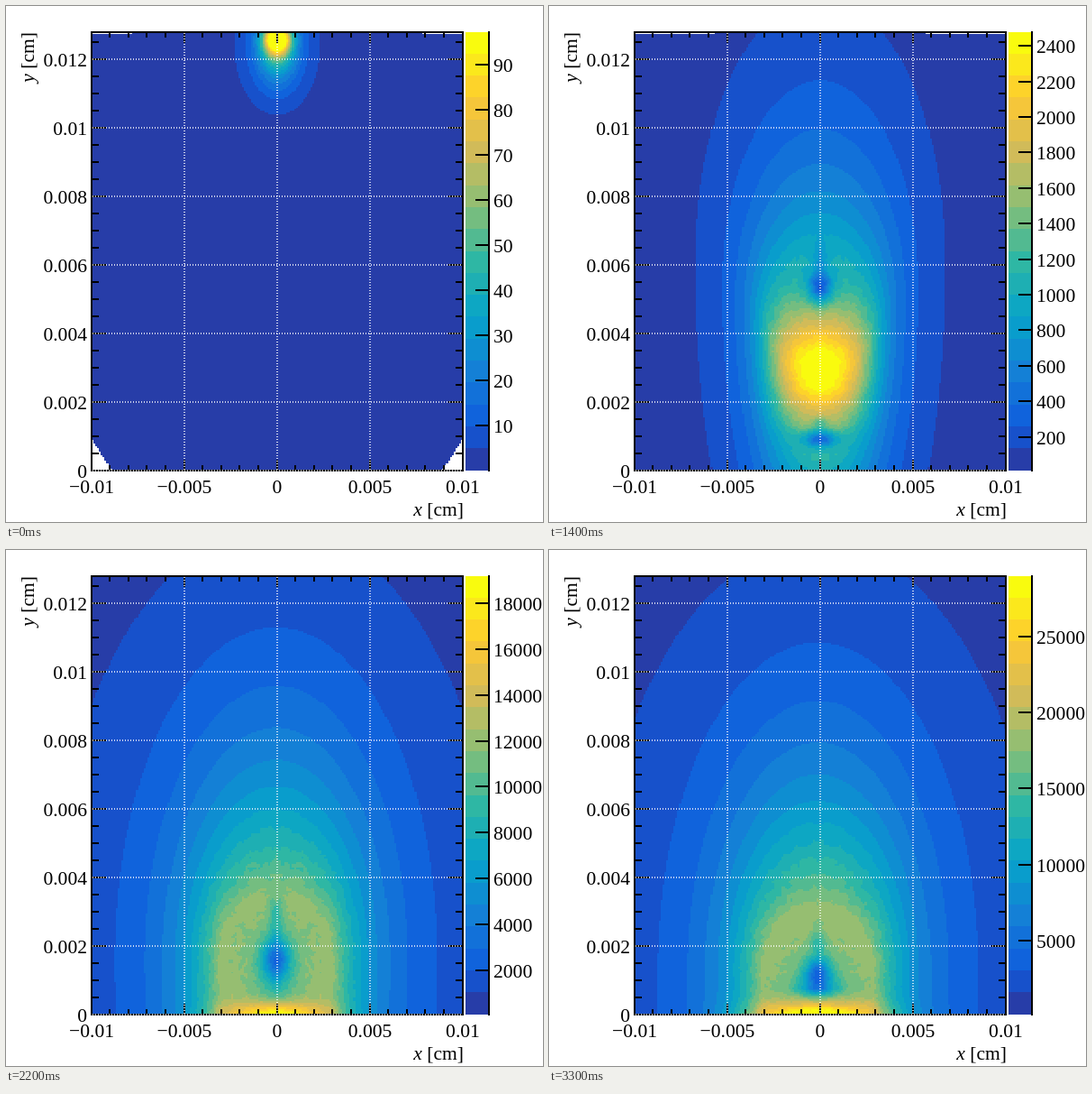
Write an HTML page with a canvas that moves like this. It is 596x572 px and loops after 3.4 s.

```html
<!DOCTYPE html>
<html lang="en">
<head>
<meta charset="utf-8">
<title>Field map</title>
<style>
html, body { margin: 0; width: 100%; height: 100%; overflow: hidden; background: #fff; }
canvas { display: block; }
</style>
</head>
<body>
<canvas id="stage" width="596" height="572"></canvas>
<script>
const ctx = document.getElementById('stage').getContext('2d');
const FRAMES = 34, STEP = 100;
const L = 95, T = 29, W = 412, H = 486, R = L + W, B = T + H;
const COLS = 200, ROWS = 256, BANDS = 20;
const FONT = '21.6px "Liberation Serif", "Times New Roman", serif';

const clamp = (v, lo, hi) => Math.max(lo, Math.min(hi, v));
const mix = (a, b, u) => Array.isArray(a) ? a.map((v, i) => mix(v, b[i], u)) : a + (b - a) * u;

// Colour scale: nine even stops, sampled once per band
const red = [.2082, .0592, .078, .0232, .1802, .5301, .8186, .9956, .9764];
const green = [.1664, .3599, .5041, .6419, .7178, .7492, .7328, .7862, .9832];
const blue = [.5293, .8684, .8385, .7914, .6425, .4662, .3499, .1968, .0539];
const palette = Array.from({ length: BANDS }, (_, k) => {
  const p = Math.floor((k + .99) * 255 / BANDS) / 254 * 8;
  const i = Math.min(7, Math.floor(p));
  return [red, green, blue].map(c => Math.round(255 * mix(c[i], c[i + 1], p - i)));
});

// width, fall: outer half width and its power law over the levels
// mid, top, bottom: y at the lowest and the highest level
// glow, upper, lower: y, x radius, y radius, strength
const start = {
  at: 0, max: 97.2, cap: 20, width: 48, fall: .45, mid: [42, 38], top: [-18, 28], bottom: [121, 46],
  glow: [38, 14, 12, 5], upper: [45, 4, 6, 0], lower: [70, 6, 10, 0]
};
const drift = {
  at: 4, max: 85.9, cap: 12, width: 78, fall: .45, mid: [170, 85], top: [-33, 0], bottom: [307, 125],
  glow: [118, 18, 24, 9], upper: [74, 5, 14, -11], lower: [175, 9, 22, -6]
};
const swell = {
  at: 8, max: 266.5, cap: 20, width: 106, fall: .4, mid: [265, 232], top: [-205, 215], bottom: [481, 236],
  glow: [235, 18, 18, 1], upper: [158, 9, 13, -8], lower: [297, 15, 9, -5]
};
const plunge = {
  at: 14, max: 2480, cap: 20, width: 139, fall: .35, mid: [285, 400], top: [-10, 390], bottom: [740, 420],
  glow: [400, 32, 30, 1], upper: [312, 13, 17, -7], lower: [480, 16, 9, -6.5]
};
const strike = {
  at: 19, max: 12470, cap: 12.5, width: 261, fall: .5, mid: [440, 440], top: [-56, 440], bottom: [1140, 560],
  glow: [522, 42, 20, 8], upper: [440, 15, 32, -8], lower: [500, 26, 10, 0]
};
const steady = {
  at: 25, max: 29550, cap: 12.5, width: 246, fall: .5, mid: [470, 470], top: [5, 470], bottom: [1170, 600],
  glow: [518, 66, 16, 9], upper: [470, 15, 17, -7], lower: [487, 22, 8, -2.5]
};
const settle = { ...steady, at: 33, max: 29020, width: 252, top: [-8, 470], lower: [487, 24, 8, -3.5] };
const keys = [start, drift, swell, plunge, strike, steady, settle];

// A dip carries a wide shallow halo and a narrow trail above it
const dip = ([y, rx, ry, power]) => [
  [y, rx, ry, power],
  [y, rx * 2.2, ry * 1.6, power * .3],
  [y - ry * 2, rx * .6, ry, power * .35]
];

function ringAt(pose, k) {
  const u = Math.log(k) / Math.log(BANDS);
  const y = mix(...pose.mid, u);
  const w = pose.width * k ** -pose.fall * Math.sqrt(1 - (k / BANDS) ** 3);
  return [y, w, y - mix(...pose.top, u), mix(...pose.bottom, u) - y].map(v => Math.max(.5, v));
}

function poseAt(n) {
  let i = 0;
  while (i < keys.length - 2 && n >= keys[i + 1].at) i++;
  const a = keys[i], b = keys[i + 1], u = (n - a.at) / (b.at - a.at);
  const pose = { n };
  for (const p in a) pose[p] = mix(a[p], b[p], u);
  pose.max = a.max * (b.max / a.max) ** u;
  pose.min = pose.max * .005 * Math.min(1, n / 14);
  pose.cx = 301 - 2.5 * clamp((n - 19) / 6, 0, 1);
  pose.rim = n < 16 ? 160 - 3 * n : W;
  pose.grain = Math.min(1, n / 4);
  pose.rings = Array.from({ length: BANDS }, (_, k) => ringAt(pose, k + 1));
  const head = [38, 11, 8, 10 * Math.exp(-(((n - 4) / 4) ** 2))];
  pose.spots = [pose.glow, head, ...dip(pose.upper), ...dip(pose.lower)];
  return pose;
}

function hash(x, y, n) {
  let h = Math.imul(x + 11, 374761393) ^ Math.imul(y + 7, 668265263) ^ Math.imul(n + 3, 1274126177);
  h = Math.imul(h ^ (h >>> 13), 1103515245);
  return ((h ^ (h >>> 16)) >>> 0) / 4294967296 - .5;
}
function grainAt(x, y, n) {
  const i = Math.floor(x), j = Math.floor(y), u = x - i, v = y - j;
  return mix(mix(hash(i, j, n), hash(i + 1, j, n), u), mix(hash(i, j + 1, n), hash(i + 1, j + 1, n), u), v);
}

function reach(ring, x, y) {
  const dy = y - ring[0];
  return Math.hypot(x / ring[1], dy / (dy < 0 ? ring[2] : ring[3]));
}

function fieldAt(pose, x, y) {
  let k = BANDS, d = 0, above = 2;
  for (; k > 0; k--) {
    d = reach(pose.rings[k - 1], x, y);
    if (d < 1) break;
    above = d;
  }
  if (k === 0) return 0;
  let v = Math.min(pose.cap, k + (1 - d) / (above - d));
  const rough = clamp((v - 6) / 4, 0, 1);
  for (const [sy, rx, ry, power] of pose.spots) {
    const q = (x / rx) ** 2 + ((y - sy) / ry) ** 2;
    if (q < 9) v += power * Math.exp(-q);
  }
  if (rough) v += rough * pose.grain * grainAt(x / 4.12, y / 3.8, pose.n);
  return clamp(v, 0, BANDS - 1);
}

// The emptiest corners stay white
function isBlank(pose, x, y, row) {
  const far = Math.hypot(x / (310 + 60 * pose.n), (y - 40) / (588 + 100 * pose.n));
  return far > 1 || (row === 0 && x > pose.rim);
}

const map = document.createElement('canvas');
map.width = COLS;
map.height = ROWS;
const mapCtx = map.getContext('2d');
const pixels = mapCtx.createImageData(COLS, ROWS);

function drawMap(pose) {
  pixels.data.fill(255);
  for (let j = 0; j < ROWS; j++) {
    const y = T + (j + .5) * H / ROWS;
    for (let i = 0; i < COLS; i++) {
      const x = Math.abs(L + (i + .5) * W / COLS - pose.cx);
      if (isBlank(pose, x, y, j)) continue;
      pixels.data.set(palette[Math.floor(fieldAt(pose, x, y))], 4 * (j * COLS + i));
    }
  }
  mapCtx.putImageData(pixels, 0, 0);
  ctx.imageSmoothingEnabled = false;
  ctx.drawImage(map, L, T, W, H);
}

function line(x1, y1, x2, y2) {
  ctx.beginPath();
  ctx.moveTo(x1, y1);
  ctx.lineTo(x2, y2);
  ctx.stroke();
}

function label(text, x, y, align) {
  ctx.font = FONT;
  ctx.textAlign = align;
  ctx.fillText(text, x, y);
}

function title(letter, x, y, turn) {
  ctx.save();
  ctx.translate(x, y);
  ctx.rotate(turn);
  label(' [cm]', 0, 0, 'right');
  const w = ctx.measureText(' [cm]').width;
  ctx.font = 'italic ' + FONT;
  ctx.fillText(letter, -w, 0);
  ctx.restore();
}

function drawAxes() {
  ctx.strokeStyle = ctx.fillStyle = '#000';
  ctx.lineWidth = 2;
  ctx.strokeRect(L, T, W, H);
  for (let i = 0; i <= 20; i++) {
    const x = Math.floor(L + i * W / 20), len = i % 5 ? 6 : 12;
    line(x, B, x, B - len);
    line(x, T, x, T + len);
  }
  for (let i = 0; i <= 25; i++) {
    const y = B - i * 19, len = i % 4 ? 8 : 16;
    line(L, y, L + len, y);
    line(R, y, R - len, y);
  }

  ctx.strokeStyle = '#fff';
  ctx.lineWidth = 1.5;
  ctx.setLineDash([1, 2]);
  for (let i = 1; i < 4; i++) line(L + i * 103, T + 1, L + i * 103, B);
  for (let i = 0; i <= 6; i++) line(L + 1, B - i * 76, R, B - i * 76);
  ctx.setLineDash([]);

  for (let i = 0; i <= 6; i++) label(String(+(i * .002).toFixed(3)), 90, B - i * 76 + 8, 'right');
  for (let i = -2; i <= 2; i++) {
    label(String(+(i * .005).toFixed(3)).replace('-', '\u2212'), 301 + i * 103, 540, 'center');
  }
  title('x', 508, 565, 0);
  title('y', 31, 29, -Math.PI / 2);
}

function tickStep(max) {
  for (let p = 1; ; p *= 10) {
    for (const m of [1, 2, 5]) if (max / (m * p) < 12.42) return m * p;
  }
}

function drawScale({ min, max }) {
  const edge = k => Math.floor(B - k * H / BANDS);
  palette.forEach((c, k) => {
    ctx.fillStyle = `rgb(${c})`;
    ctx.fillRect(510, edge(k + 1), 26, edge(k) - edge(k + 1));
  });
  ctx.strokeStyle = ctx.fillStyle = '#000';
  ctx.lineWidth = 2;
  line(536, T - 1, 536, B + 1);
  const step = tickStep(max);
  for (let v = step; v <= max; v += step) {
    const y = Math.floor(B - (v - min) / (max - min) * H);
    line(521, y, 536, y);
    label(String(v), 541, y + 8, 'left');
  }
}

function draw(n) {
  const pose = poseAt(n);
  ctx.fillStyle = '#fff';
  ctx.fillRect(0, 0, 596, 572);
  drawMap(pose);
  drawAxes();
  drawScale(pose);
}

const begin = performance.now();
let shown = -1;
function tick() {
  const n = Math.floor((performance.now() - begin) / STEP) % FRAMES;
  if (n !== shown) draw(shown = n);
  requestAnimationFrame(tick);
}
tick();
</script>
</body>
</html>
```
